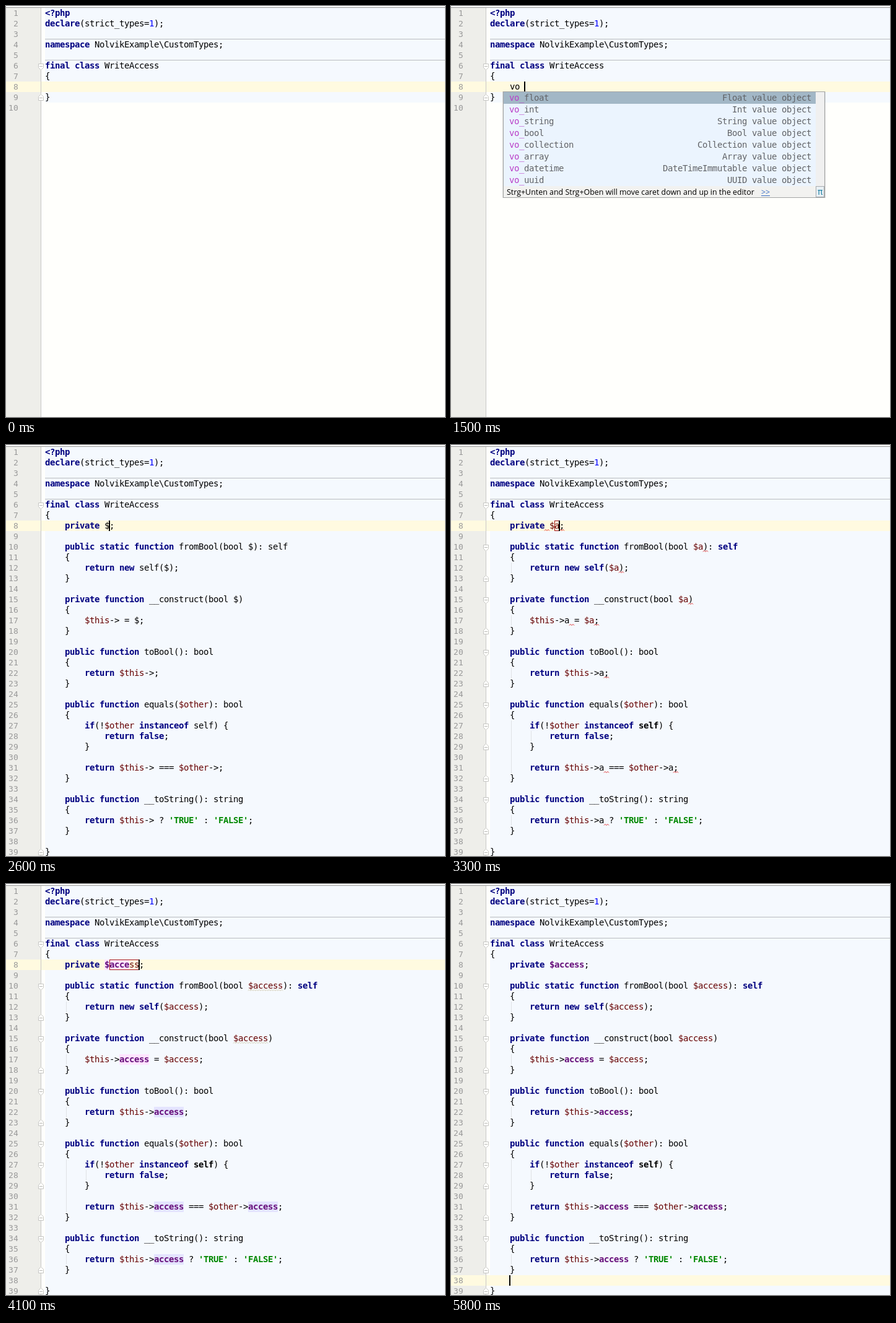
Animation of 709x664 px, one loop 6300 ms. Source, as an HTML page with a canvas:

```html
<!DOCTYPE html>
<html lang="en">
<head>
<meta charset="utf-8">
<title>Live template</title>
<style>
  html, body { margin: 0; width: 100%; height: 100%; overflow: hidden; background: #fffffc; }
  canvas { display: block; }
</style>
</head>
<body>
<canvas id="stage" width="709" height="664"></canvas>
<script>
const ctx = document.getElementById('stage').getContext('2d');
const WIDTH = 709, HEIGHT = 664, LOOP = 6300;
const LEFT = 63, TOP = 3, CELL = 8, LINE = 17;
const MONO = '"DejaVu Sans Mono", monospace';
const UI = '12.45px "Open Sans", "Noto Sans", sans-serif';
const NAVY = '#000080', MAROON = '#660000', PURPLE = '#660e7a', BLACK = '#000';

const HEAD = String.raw`<?php
declare(strict_types=1);

namespace NolvikExample\CustomTypes;

final class WriteAccess
{`.split('\n');

// "@" stands for the name that is being typed.
const BODY = String.raw`    private $@;

    public static function fromBool(bool $@): self
    {
        return new self($@);
    }

    private function __construct(bool $@)
    {
        $this->@ = $@;
    }

    public function toBool(): bool
    {
        return $this->@;
    }

    public function equals($other): bool
    {
        if(!$other instanceof self) {
            return false;
        }

        return $this->@ === $other->@;
    }

    public function __toString(): string
    {
        return $this->@ ? 'TRUE' : 'FALSE';
    }

}`.split('\n');

const KEYWORDS = new Set(('<?php declare namespace final class private public static function ' +
  'return new if instanceof false').split(' '));
const TOKEN = /<\?php|'[^']*'|\$\w*|->|\w+|./g;
const ITEMS = [['float', 'Float'], ['int', 'Int'], ['string', 'String'], ['bool', 'Bool'],
  ['collection', 'Collection'], ['array', 'Array'], ['datetime', 'DateTimeImmutable'], ['uuid', 'UUID']];

const SHORTCUT_TIMES = [1100, 1200, 1500, 2000];
const NAME_TIMES = [3300, 3600, 3700, 3900, 4000, 4100];
const typed = (text, times, t) => text.slice(0, times.filter(time => time <= t).length);

const lineTop = n => TOP + LINE * (n - 1);
const colX = col => LEFT + CELL * col;

function rect(x, y, w, h, color) {
  ctx.fillStyle = color;
  ctx.fillRect(x, y, w, h);
}

function mono(text, x, baseline, color, bold = false, size = 14) {
  ctx.font = `${bold ? 'bold ' : ''}${size}px ${MONO}`;
  ctx.fillStyle = color;
  [...text].forEach((char, i) => ctx.fillText(char, x + i * CELL, baseline));
}

function squiggle(line, col, cells, color) {
  const x = colX(col), y = lineTop(line);
  ctx.beginPath();
  for (let dx = 0; dx <= cells * CELL; dx += 2) ctx.lineTo(x + dx, y + (dx % 4 ? 14.5 : 16.5));
  ctx.strokeStyle = color;
  ctx.stroke();
}

function foldMarker(line, opening) {
  const y = lineTop(line) + (opening ? 5.5 : 13.5), dir = opening ? 1 : -1;
  ctx.beginPath();
  ctx.moveTo(52.5, y);
  ctx.lineTo(60.5, y);
  ctx.lineTo(60.5, y + 6 * dir);
  ctx.lineTo(56.5, y + 10 * dir);
  ctx.lineTo(52.5, y + 6 * dir);
  ctx.closePath();
  ctx.fillStyle = '#fffffc';
  ctx.fill();
  ctx.strokeStyle = '#c6c6c4';
  ctx.stroke();
  rect(54, y - 0.5 + 4 * dir, 5, 1, '#b8b8b6');
}

function tokenStyle(token, line, state) {
  if (KEYWORDS.has(token)) return [NAVY, true];
  if (token === 'self' && state.analysed) return [line === 27 ? BLACK : NAVY, true];
  if (token[0] === "'") return ['#008800', true];
  if (/^\$\w/.test(token)) return [MAROON, false];
  if (/^\d/.test(token)) return ['#0000ff', false];
  return [BLACK, false];
}

function drawField(token, line, x, state) {
  const length = line === 8 ? state.fieldLength + 1 : token.length;
  const y = lineTop(line), known = token.slice(0, length);
  if (state.highlighted) {
    rect(x, y, known.length * CELL, LINE, line === 8 || line === 17 ? '#ffe4ff' : '#e4e4ff');
  }
  mono(known, x, y + 13, PURPLE, true);
  mono(token.slice(length), x + known.length * CELL, y + 13, MAROON);
}

function drawCode(text, line, state) {
  let col = 0, previous = '';
  for (const [token] of text.matchAll(TOKEN)) {
    const isField = state.resolved &&
      (previous === '->' || (line === 8 && token[0] === '$'));
    if (isField) drawField(token, line, colX(col), state);
    else mono(token, colX(col), lineTop(line) + 13, ...tokenStyle(token, line, state));
    col += token.length;
    previous = token;
  }
}

function drawErrors(template, line, name) {
  let col = 0;
  for (const part of template.split('@').slice(0, -1)) {
    col += part.length + name.length;
    squiggle(line, col, 1, '#e03030');
  }
}

function drawFooter(y) {
  rect(85, y, 518, 18, '#f2f2f0');
  ctx.font = UI;
  ctx.fillStyle = BLACK;
  ctx.fillText('Strg+Unten and Strg+Oben will move caret down and up in the editor', 90, y + 14);
  ctx.fillStyle = '#3c6fc4';
  ctx.fillText('>>', 501, y + 14);
  rect(501, y + 15, 14, 1, '#3c6fc4');
}

function drawPopup(shortcut) {
  const filtered = shortcut.length > 3;
  const items = filtered ? ITEMS.filter(([key]) => key === 'bool') : ITEMS;
  const rowWidth = filtered ? 518 : 504, rightEdge = filtered ? 596 : 582;
  const footerY = 139 + items.length * 19;
  rect(83, 138, 522, footerY - 119, 'rgba(0,0,0,.13)');
  rect(84, 138, 520, footerY - 119, '#a2a4a4');
  rect(85, 139, 518, footerY - 139, '#f0f0f0');
  items.forEach(([key, label], i) => {
    const y = 139 + i * 19, word = 'vo_' + key, note = label + ' value object';
    const matched = shortcut.length;
    rect(85, y, rowWidth, 19, i ? '#ebf4fe' : '#a2b7c6');
    mono(word.slice(0, matched), 94, y + 14, '#b93fc8');
    mono(word.slice(matched), 94 + matched * CELL, y + 14, '#626468');
    mono(note, rightEdge - note.length * CELL, y + 14, '#626468');
  });
  drawFooter(footerY);
  if (!filtered) {
    rect(589, footerY, 14, 18, '#a8acb0');
    rect(590, footerY + 1, 12, 16, '#e9f0f4');
    mono('π', 592, footerY + 14, '#2484a6');
  }
}

function draw(now) {
  const t = now % LOOP;
  const expanded = t >= 2600, done = t >= 4400;
  const shortcut = typed('vo b', SHORTCUT_TIMES, t);
  const name = typed('access', NAME_TIMES, t);
  const state = {
    analysed: t >= 2900,
    resolved: t >= 3700,
    highlighted: t >= 3700 && t < 4700,
    fieldLength: t < 4700 ? Math.min(name.length, 4) : 6
  };
  const templates = [...HEAD, ...(expanded ? BODY : ['    ' + shortcut, '}'])];
  const lineCount = templates.length;
  const caretLine = done ? 38 : 8;
  const caretCol = done ? 4 : expanded ? 13 + name.length : 4 + shortcut.length;

  // Page, gutter and current line
  ctx.lineWidth = 1;
  rect(0, 0, WIDTH, HEIGHT, '#fffffc');
  rect(0, TOP, 56, HEIGHT, '#eeeeea');
  rect(LEFT, TOP, WIDTH, lineCount * LINE, '#f5f9fe');
  rect(0, lineTop(caretLine), WIDTH, LINE, '#fffae0');
  rect(0, 2, WIDTH, 1, '#949494');
  rect(56, TOP, 1, HEIGHT, '#c8c8c6');
  for (const y of [53, 87]) rect(LEFT, y, WIDTH, 1, '#b9bcbe');

  for (let n = 1; n <= (expanded ? 39 : 10); n++) {
    mono(String(n).padStart(2), 4, lineTop(n) + 13, '#999', false, 13);
  }

  if (state.analysed) {
    for (const [line, rows, x] of [[12, 1, 97], [17, 1, 97], [22, 1, 97], [27, 5, 97], [28, 1, 129], [36, 1, 97]]) {
      rect(x, lineTop(line), 1, rows * LINE, '#dfe2e5');
    }
  }
  const opens = state.analysed ? [6, 10, 15, 20, 25, 27, 34] : [6];
  const closes = state.analysed ? [13, 18, 23, 29, 32, 37, 39] : [lineCount];
  opens.forEach(line => foldMarker(line, true));
  closes.forEach(line => foldMarker(line, false));

  templates.forEach((template, i) => {
    drawCode(template.replaceAll('@', name), i + 1, state);
    if (state.analysed && !state.resolved) drawErrors(template, i + 1, name);
  });
  if (state.analysed && !state.resolved) squiggle(8, 11, 1, '#e03030');
  if (state.resolved && !done) {
    squiggle(10, 41, name.length + 1, '#d2cdb0');
    squiggle(15, 38, name.length + 1, '#d2cdb0');
  }

  if (expanded && !done) {
    ctx.strokeStyle = '#a81818';
    ctx.strokeRect(colX(13) + 0.5, lineTop(8) + 0.5, name.length * CELL, 16);
  }
  if (t >= 700 && !(t >= 5300 && t < 5800)) {
    rect(colX(caretCol) - 1, lineTop(caretLine), 2, LINE, BLACK);
  }
  if (t >= 1200 && t < 2500) drawPopup(shortcut);

  requestAnimationFrame(draw);
}
requestAnimationFrame(draw);
</script>
</body>
</html>
```
